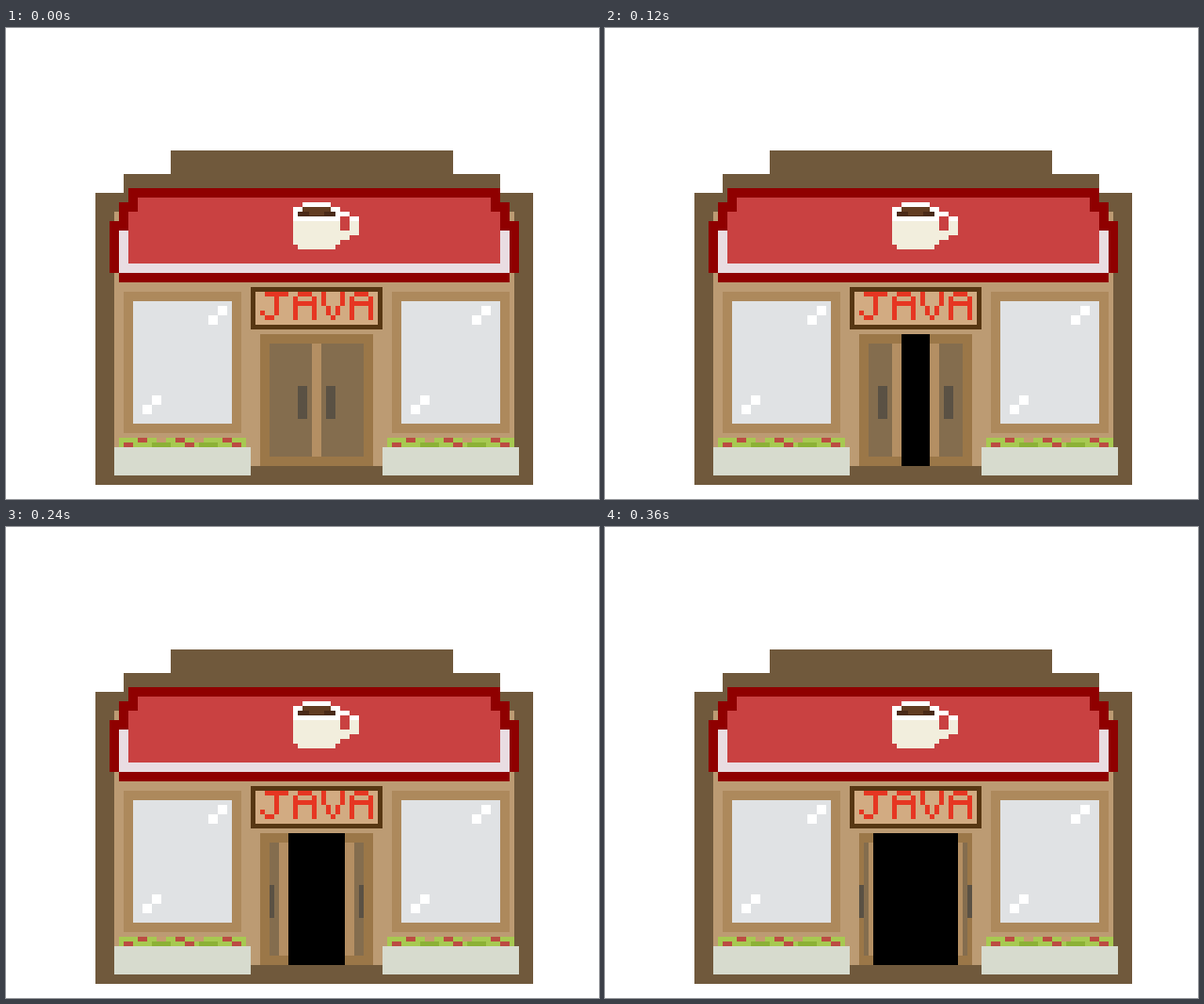
An HTML page for the animation above (0.4 s loop, 630 by 500 pixels).

```html
<!DOCTYPE html>
<html lang="en">
<head>
<meta charset="utf-8">
<title>Coffee shop</title>
<style>
  html, body { margin: 0; width: 100%; height: 100%; overflow: hidden; background: #fff; }
  svg { display: block; width: 630px; height: 500px; shape-rendering: crispEdges; }

  .panel, .post, .handle, .gap { transform-box: fill-box; transform-origin: 0 0; }
  .panel  { fill: #846d4e; animation: panel .4s step-end infinite; }
  .post   { fill: #b48f63; animation: post .4s step-end infinite; }
  .handle { fill: #5a5144; animation: handle .4s step-end infinite; }
  .gap    { fill: #000; transform-origin: 50% 0; animation: open .4s steps(10) infinite; }

  @keyframes open {
    from { transform: scaleX(0); }
    to   { transform: scaleX(1); }
  }
  @keyframes panel {
    0%  { transform: none; }
    90% { transform: translateX(-5px); }
  }
  @keyframes post {
    0%  { transform: translateX(0); }
    10% { transform: translateX(-10px); }
    20% { transform: translateX(-15px); }
    30% { transform: translateX(-20px); }
    40% { transform: translateX(-25px); }
    50% { transform: translateX(-30px); }
    60%, 70% { transform: translateX(-35px); }
    80% { transform: translateX(-40px); }
    90% { transform: translateX(-45px); }
  }
  @keyframes handle {
    0%  { transform: translateX(0); }
    10% { transform: translateX(-5px); }
    20% { transform: translateX(-15px); }
    30% { transform: translateX(-20px); }
    40% { transform: translateX(-20px) scaleX(.5); }
    50% { transform: translateX(-25px) scaleX(.5); }
    60%, 70% { transform: translateX(-30px) scaleX(.5); }
    80% { transform: translateX(-35px) scaleX(.5); }
    90% { transform: translateX(-40px) scaleX(.5); }
  }
</style>
</head>
<body>
<svg viewBox="0 0 630 500">
  <defs>
    <g id="window">
      <path fill="#ad895c" d="M125 280h125v150h-125z"/>
      <path fill="#e0e2e4" d="M135 290h105v130h-105z"/>
      <path fill="#fff" d="M155 390h10v10h-10zM145 400h10v10h-10z"/>
    </g>
    <path id="glint" fill="#fff" d="M225 295h10v10h-10zM215 305h10v10h-10z"/>
    <g id="planter">
      <path fill="#d7dbce" d="M115 445h145v30h-145z"/>
      <path fill="#a7c951" d="M120 435h135v10h-135z"/>
      <path fill="#c49a70" d="M160 435h10v5h-10zM200 435h10v5h-10z"/>
      <path fill="#8cb136" d="M155 440h20v5h-20zM205 440h20v5h-20z"/>
      <path fill="#bb4c42" d="M140 435h10v5h-10zM180 435h10v5h-10zM230 435h10v5h-10zM125 440h10v5h-10zM190 440h10v5h-10zM240 440h10v5h-10z"/>
    </g>
    <path id="a" d="M5 0h15v5h-15zM0 5h5v25h-5zM20 5h5v25h-5zM5 10h15v5h-15z"/>
  </defs>

  <!-- building -->
  <path fill="#70593c" d="M175 130h300v25h50v20h35v310h-465v-310h30v-20h50z"/>
  <path fill="#bc9b73" d="M115 195h425v270h-425z"/>

  <!-- awning -->
  <path fill="#8f0000" d="M130 170h395v15h10v20h10v55h-10v10h-415v-10h-10v-55h10v-20h10z"/>
  <path fill="#e9dde2" d="M120 215h415v45h-415z"/>
  <path fill="#c94141" d="M140 180h375v15h10v55h-395v-55h10z"/>

  <!-- cup -->
  <path fill="#fff" d="M315 185h30v5h10v5h10v5h10v5h-70v-15h10z"/>
  <path fill="#f2eedd" d="M305 205h50v25h-5v5h-40v-5h-5z"/>
  <path fill="#f2eedd" d="M365 205h10v15h-10v5h-10v-10h10z"/>
  <path fill="#c94141" d="M355 200h10v5h-10z"/>
  <path fill="#fff" d="M350 200h5v5h-5z"/>
  <path fill="#623d22" d="M315 190h30v5h-30z"/>
  <path fill="#4a2a18" d="M310 195h40v5h-40z"/>
  <path fill="#623d22" d="M322 195h16v4h-16z"/>

  <!-- sign -->
  <path fill="#573713" d="M260 275h140v45h-140z"/>
  <path fill="#d2ab82" d="M265 280h130v35h-130z"/>
  <g fill="#e63622">
    <path d="M275 280h25v5h-10v20h-5v5h-10v-5h10v-20h-10zM270 300h5v5h-5z"/>
    <use href="#a" x="305" y="280"/>
    <path d="M335 280h5v15h-5zM355 280h5v15h-5zM340 295h5v10h-5zM350 295h5v10h-5zM345 305h5v5h-5z"/>
    <use href="#a" x="365" y="280"/>
  </g>

  <use href="#window"/>
  <use href="#window" x="285"/>
  <use href="#glint"/>
  <use href="#glint" x="280"/>
  <use href="#planter"/>
  <use href="#planter" x="285"/>

  <!-- sliding doors -->
  <path fill="#9b7748" d="M270 325h120v140h-120z"/>
  <g>
    <rect class="panel" x="280" y="335" width="45" height="120"/>
    <rect class="post" x="325" y="335" width="10" height="120"/>
    <rect class="handle" x="310" y="380" width="10" height="35"/>
  </g>
  <g transform="matrix(-1 0 0 1 660 0)">
    <rect class="panel" x="280" y="335" width="45" height="120"/>
    <rect class="post" x="325" y="335" width="10" height="120"/>
    <rect class="handle" x="310" y="380" width="10" height="35"/>
  </g>
  <rect class="gap" x="280" y="325" width="100" height="140"/>
</svg>
</body>
</html>
```
